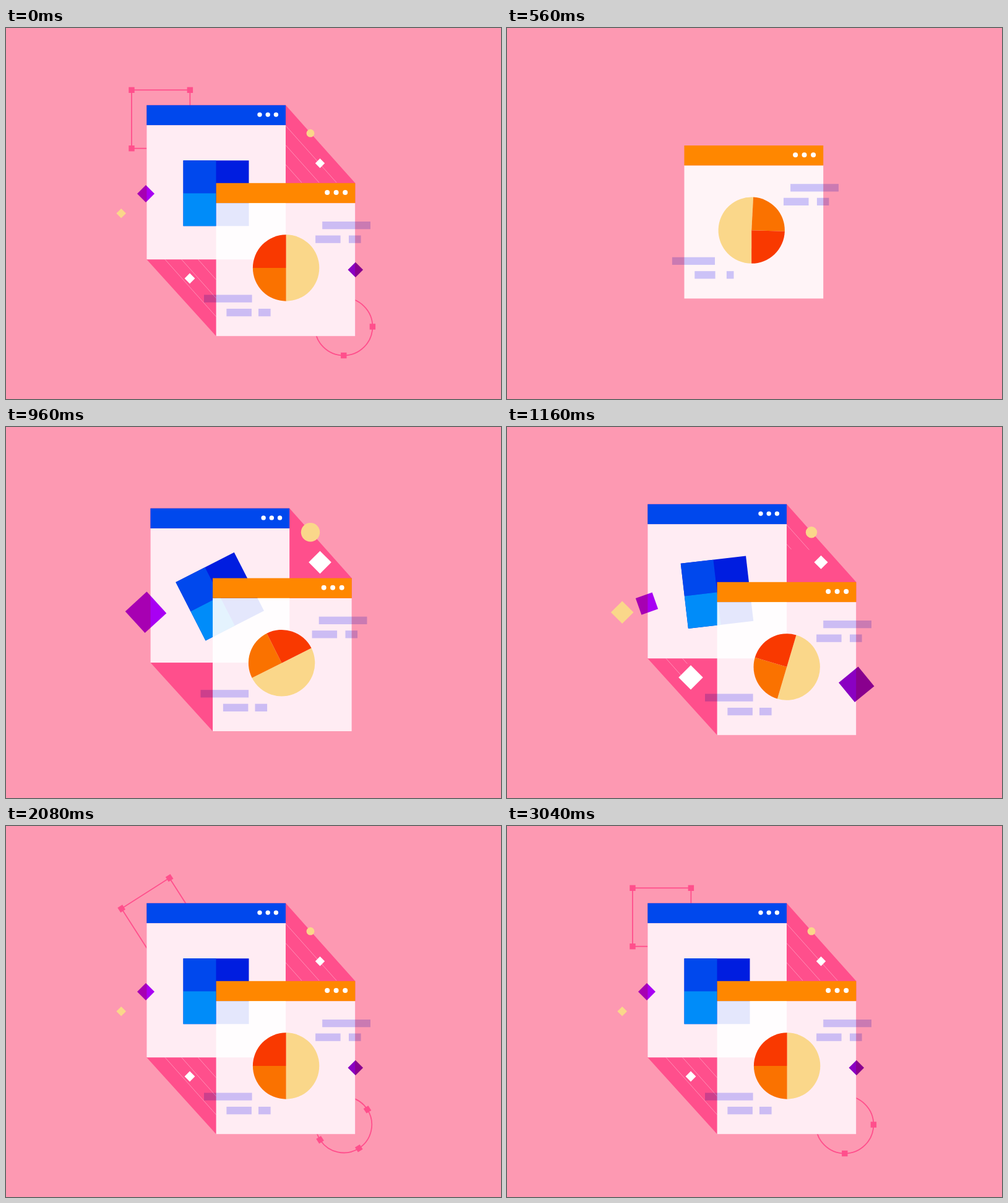
An HTML page for the animation above (3080 ms loop, 800 px wide and 600 px high).

```html
<!DOCTYPE html>
<html lang="en">
<head>
<meta charset="utf-8">
<title>Windows</title>
<style>
  html, body { margin: 0; width: 100%; height: 100%; overflow: hidden; background: #fd99b2; }
  svg { display: block; width: 800px; height: 600px; }
  .ink { mix-blend-mode: multiply; }
</style>
</head>
<body>
<svg id="stage" viewBox="0 0 800 600"></svg>
<script>
const LOOP = 3080;
const STEP = 40;
const HOT = '#ff4f8c', YELLOW = '#fad78a', GLASS = { fill: '#fff', 'fill-opacity': 0.894 };
const WIN_W = 224.7, BAR_H = 32.3;

const set = (el, attrs) => {
  for (const key in attrs) el.setAttribute(key, attrs[key]);
  return el;
};
const add = (parent, tag, attrs = {}) =>
  parent.appendChild(set(document.createElementNS('http://www.w3.org/2000/svg', tag), attrs));
const rect = (parent, x, y, width, height, fill) => add(parent, 'rect', { x, y, width, height, fill });
const place = (el, x, y, turn = 0, scale = 1) =>
  set(el, { transform: `translate(${x} ${y}) rotate(${turn}) scale(${Math.max(scale, 0)})` });
const show = (el, on) => set(el, { visibility: on ? 'visible' : 'hidden' });

const lerp = (a, b, k) => a + (b - a) * k;
const span = (t, start, length) => Math.min(1, Math.max(0, (t - start) / length));
const out = (u, power) => 1 - (1 - u) ** power;
const smooth = u => u * u * (3 - 2 * u);

// Eases along a curve with level ends; x1 and x2 set the pull of each end.
function ease(u, x1, x2) {
  let lo = 0, hi = 1;
  for (let i = 0; i < 24; i++) {
    const s = (lo + hi) / 2, r = 1 - s;
    if (3 * r * r * s * x1 + 3 * r * s * s * x2 + s ** 3 < u) lo = s; else hi = s;
  }
  return smooth(lo);
}

const stage = document.getElementById('stage');
rect(stage, 0, 0, 800, 600, '#fd99b2');

// Outlined shapes with handles
function outline(x, y, tag, shape, handles) {
  const g = add(stage, 'g');
  add(g, tag, { ...shape, fill: 'none', stroke: HOT, 'stroke-width': 1.8 });
  for (const [hx, hy] of handles) rect(g, hx - 4.7, hy - 4.7, 9.4, 9.4, HOT);
  return { g, x, y };
}
const outlines = [
  outline(250.2, 147.5, 'rect', { x: -47.2, y: -47.2, width: 94.4, height: 94.4 },
    [[-47.2, -47.2], [47.2, -47.2], [-47.2, 47.2], [47.2, 47.2]]),
  outline(545.8, 483, 'circle', { r: 46.6 }, [[46.6, 0], [0, 46.6], [-46.6, 0], [0, -46.6]])
];

// Folds between the windows
const hull = add(stage, 'polygon', { fill: HOT });
const stripes = [0, 1, 2].flatMap(i => {
  const height = 92 - 31.5 * i, left = 257 + 26.7 * i;
  return [
    { x: 452, y: 158 + 31.5 * i, dx: height / 1.12, dy: height },
    { x: left, y: 374.3, dx: 339.6 - left, dy: (339.6 - left) * 1.12 }
  ].map(s => ({ ...s, delay: 60 * i, el: add(stage, 'line', { stroke: '#ff8fb6', 'stroke-width': 1 }) }));
});

// Back window
const back = add(stage, 'g');
set(rect(back, 0, BAR_H, WIN_W, 217.2), GLASS);
rect(back, 0, 0, WIN_W, BAR_H, '#0048ed');
for (const x of [182.7, 195.9, 209.1]) add(back, 'circle', { cx: x, cy: 15.3, r: 3.7, fill: '#fff' });
const tiles = add(stage, 'g');
rect(tiles, -53, -53, 106, 106, '#001de0');
const lightTiles = [
  rect(tiles, -53, -53, 53, 53, '#0048ed'),
  rect(tiles, -53, 0, 53, 53, '#008cf9')
];

// Front window
const front = add(stage, 'g');
const body = set(rect(front, 0, BAR_H, WIN_W, 0), GLASS);
const header = rect(front, 0, 0, WIN_W, BAR_H, '#ff8700');
const dots = [179.6, 194, 208.6].map(x => add(front, 'circle', { cx: x, fill: '#fff' }));
const pie = add(front, 'g');
const slices = [YELLOW, '#fa7200', '#f93900'].map(fill => add(pie, 'path', { fill }));
const bars = [
  [171.6, 62.2, 77.8, 150], [160.5, 84.7, 40.5, 182], [214.4, 84.7, 19.6, 274],
  [-19.6, 180.7, 77.6, 390], [16.8, 203.2, 40.5, 420], [68.4, 203.2, 19.6, 480]
].map(([x, y, width, start]) => {
  const el = rect(front, x, y, 0, 12.3, '#cccbff');
  el.classList.add('ink');
  return { el, width, start };
});

// Small pieces that pop in large and settle
function piece(x, y, r, fill, start, options = {}) {
  const g = add(stage, 'g', options.rise ? { class: 'ink' } : {});
  if (options.round) add(g, 'circle', { r, fill });
  else add(g, 'path', { d: `M0 ${-r}L${r} 0L0 ${r}L${-r} 0Z`, fill });
  return { g, x, y, start, rise: options.rise || 0 };
}
const pieces = [
  piece(492, 170.2, 6.4, YELLOW, 880, { round: true }),
  piece(507.5, 218.8, 7.7, '#fff', 880),
  piece(226, 268, 14, '#a800ff', 880, { rise: 33 }),
  piece(186.2, 299.8, 7.8, YELLOW, 1040),
  piece(297, 405, 8.4, '#fff', 1040),
  piece(564.8, 391, 12.3, '#8a00cc', 1040, { rise: 28 })
];

function wedge(from, to, r) {
  const sweep = Math.min(to - from, 359.99);
  const point = deg => {
    const a = deg * Math.PI / 180;
    return `${r * Math.sin(a)} ${-r * Math.cos(a)}`;
  };
  return `M0 0L${point(from)}A${r} ${r} 0 ${sweep > 180 ? 1 : 0} 1 ${point(from + sweep)}Z`;
}

function drawOutlines(t) {
  const turn = -90 * (1 - span(t, 1530, 1510)) ** 2.24;
  const scale = t < 1530 ? 0 : t > 2500 ? 1 : 1 - Math.exp((1530 - t) / 150);
  for (const o of outlines) {
    show(o.g, scale > 0);
    place(o.g, o.x, o.y, turn, scale);
  }
}

function drawWindows(t) {
  const move = ease(span(t, 708, 408), 0.3, 0.2);
  const bx = lerp(286.5, 227.3, move), by = lerp(190, 124.8, move);
  const fx = lerp(286.5, 339.6, move), fy = lerp(190, 250.8, move);
  const split = t >= 700;

  show(hull, split);
  show(back, split);
  place(back, bx, by);
  set(hull, { points: [bx, by, bx + WIN_W, by, fx + WIN_W, fy, fx + WIN_W, fy + 247.5, fx, fy + 247.5, bx, by + 249.5] });

  for (const s of stripes) {
    const k = smooth(span(t, 1040 + s.delay, 260));
    show(s.el, k > 0);
    set(s.el, { x1: s.x, y1: s.y, x2: s.x + s.dx * k, y2: s.y + s.dy * k });
  }

  const tileTurn = -90 * (1 - ease(span(t, 711, 747), 0.3, 0));
  place(tiles, bx + 112.2, by + 142.5, tileTurn, out(span(t, 600, 160), 3));
  for (const tile of lightTiles) set(tile, { opacity: span(t, 800, 120) });

  place(front, fx, fy);
  const w = WIN_W * out(span(t, 40, 290), 3);
  set(header, { x: (WIN_W - w) / 2, width: w });
  set(body, { height: 215.2 * smooth(span(t, 210, 350)) });
  const drop = -60 * (1 - smooth(span(t, 200, 320)));
  dots.forEach((dot, i) => set(dot, { cy: 15.2 + drop, r: 4 * out(span(t, 160 + 40 * i, 160), 3) }));
  for (const b of bars) set(b.el, { width: b.width * out(span(t, b.start, 400), 4) });
}

function drawPie(t) {
  const spin = ease(span(t, 728, 767), 0.3, 0);
  const grow = out(span(t, 160, 480), 4);
  const part = 90 * out(span(t, 252, 480), 4);
  const start = 465 * (1 - grow), end = start + 360 * grow;
  const r = 53.7 * grow;
  place(pie, lerp(108.7, 113, spin), 137.2, 180 * (1 - spin));
  const cuts = [[start, end - 2 * part], [end - 2 * part, end - part], [end - part, end]];
  slices.forEach((slice, i) => set(slice, { d: wedge(...cuts[i], r) }));
}

function drawPieces(t) {
  for (const p of pieces) {
    const grow = span(t, p.start, 80);
    const scale = grow * lerp(2.38, 1, ease(span(t, p.start + 80, 520), 0.33, 0.12));
    const u = span(t, p.start, 800);
    const turn = p.rise ? -90 * (1 - ease(u, 0.33, 0.67)) : 0;
    show(p.g, grow > 0);
    place(p.g, p.x, p.y + p.rise * (1 - ease(u, 0.3, 0.35)), turn, scale);
  }
}

function draw(time) {
  // The loop opens on one step of the finished picture, then cuts to empty.
  const t = time < STEP ? LOOP : time;
  drawOutlines(t);
  drawWindows(t);
  drawPie(t);
  drawPieces(t);
}

const begin = performance.now();
function tick() {
  const time = (performance.now() - begin) % LOOP;
  draw(Math.floor(time / STEP) * STEP);
  requestAnimationFrame(tick);
}
draw(0);
requestAnimationFrame(tick);
</script>
</body>
</html>
```
